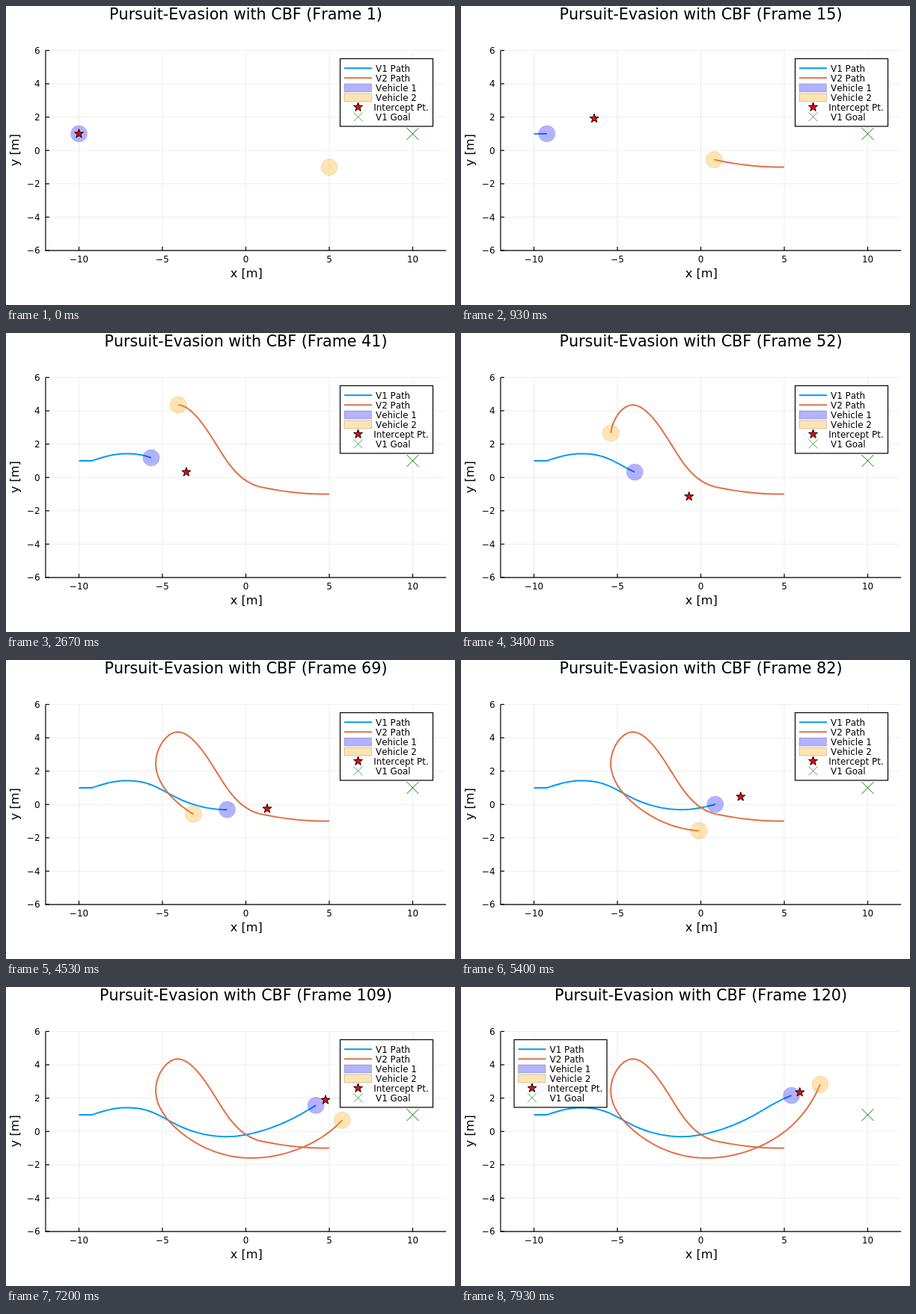
Write an HTML page that moves like this. It is 600 by 400 pixels and loops after 8000 ms.

```html
<!DOCTYPE html>
<html lang="en">
<head>
<meta charset="utf-8">
<title>Pursuit-Evasion</title>
<style>
  html, body { margin: 0; width: 100%; height: 100%; overflow: hidden; background: #fff; }
  svg { display: block; width: 600px; height: 400px; }
  text { font: 11.9px "DejaVu Sans", sans-serif; font-kerning: none; }
  .title { font-size: 20.65px; }
  .label { font-size: 16.2px; }
  .title, .label, .mid { text-anchor: middle; }
  .end { text-anchor: end; }
  .grid { stroke: #000; stroke-opacity: .1; stroke-width: .7; }
  .axis { stroke: #000; stroke-width: 1.2; fill: none; }
  .path { fill: none; stroke-width: 2; stroke-linejoin: round; }
  .v1 { stroke: #009af9; }
  .v2 { stroke: #e26f46; }
  .body1, .body2 { stroke: #000; stroke-opacity: .3; stroke-width: .6; fill-opacity: .3; }
  circle { stroke-opacity: .12 !important; }
  .body1 { fill: #00f; }
  .body2 { fill: #ffa500; }
  .star { fill: #f00; stroke: #000; stroke-width: 1; }
  .goal { stroke: #008000; stroke-width: 1; fill: none; }
  #legend .goal { stroke-width: .7; }
</style>
</head>
<body>
<svg viewBox="0 0 600 400">
  <text class="title" id="title" x="320.5" y="18"></text>
  <g id="axes"></g>
  <text class="label" x="321.3" y="363">x [m]</text>
  <text class="label" transform="translate(17 192.7) rotate(-90)">y [m]</text>
  <path class="path v1" id="path1"/>
  <path class="path v2" id="path2"/>
  <circle class="body1" id="body1" r="11.15"/>
  <circle class="body2" id="body2" r="11.15"/>
  <path class="star" id="star"/>
  <path class="goal" d="M535.5 163l16 16m0-16l-16 16"/>
  <g id="legend">
    <rect x="446.5" y="70.5" width="124" height="90.5" fill="#fff" stroke="#000" stroke-width="1.2"/>
    <path class="path v1" d="M452 83.3h37"/>
    <path class="path v2" d="M452 96.3h37"/>
    <rect class="body1" x="452" y="104" width="36.5" height="11"/>
    <rect class="body2" x="452" y="117" width="36.5" height="11"/>
    <path class="star" id="legendStar" transform="translate(470.5 135.3)"/>
    <path class="goal" d="M464.5 142.3l12 12m0-12l-12 12"/>
  </g>
</svg>
<script>
const FRAMES = 120, LOOP = 8000;
const TURN_AT = 14;               // frame at which steering begins
const LEGEND_MOVES_AT = 118;
const PURSUER_SPEED = .3;         // metres per frame

// Constant acceleration until TURN_AT, then a smooth curve that leaves with
// the velocity `turn` through a few waypoints [frame, x, y] in metres.
const evader = {
  start: [-10, 1], velocity: [0, 0], acceleration: [.0085, 0], turn: [.112, .036],
  waypoints: [[29, -7.38, 1.42], [39, -5.83, 1.235], [51, -3.96, .32], [68, -1.12, -.31],
    [81, .865, .01], [98, 3.07, .91], [113, 4.75, 1.86], [119, 5.43, 2.16]]
};
const pursuer = {
  start: [5, -1], velocity: [-.3, 0], acceleration: [0, .0049], turn: [-.283, .08],
  waypoints: [[29, -2.08, 2.47], [40, -4.05, 4.35], [51, -5.39, 2.66], [68, -3.14, -.59],
    [81, -.11, -1.58], [98, 3.94, -.7], [119, 7.15, 2.82]]
};

const el = id => document.getElementById(id);
const X = x => 320.5 + 22.3 * x;
const Y = y => 193.25 - 22.3 * y;

// Cubic spline with continuous acceleration, a given first slope and a parabolic end
function spline(times, values, firstSlope) {
  const last = times.length - 1;
  const step = i => times[i + 1] - times[i];
  const secant = i => (values[i + 1] - values[i]) / step(i);
  const slopes = times.map(() => firstSlope);
  for (let pass = 0; pass < 60; pass++) {
    for (let i = 1; i < last; i++) {
      const before = step(i - 1), after = step(i);
      slopes[i] = (3 * (after * secant(i - 1) + before * secant(i))
        - after * slopes[i - 1] - before * slopes[i + 1]) / (2 * (before + after));
    }
    slopes[last] = 2 * secant(last - 1) - slopes[last - 1];
  }
  return t => {
    let i = 0;
    while (i < last - 1 && times[i + 1] <= t) i++;
    const h = step(i), u = (t - times[i]) / h;
    return values[i] * (1 + 2 * u) * (1 - u) ** 2 + values[i + 1] * u * u * (3 - 2 * u)
      + h * u * (1 - u) * (slopes[i] * (1 - u) - slopes[i + 1] * u);
  };
}

function makeTrack({ start, velocity, acceleration, turn, waypoints }) {
  const launch = k => start.map((s, a) => s + velocity[a] * k + acceleration[a] * k * (k - 1) / 2);
  const keys = [[TURN_AT, ...launch(TURN_AT)], ...waypoints];
  const times = keys.map(key => key[0]);
  const curves = [0, 1].map(a => spline(times, keys.map(key => key[a + 1]), turn[a]));
  const position = k => k < TURN_AT ? launch(k) : curves.map(curve => curve(k));
  return Array.from({ length: FRAMES + 1 }, (_, k) => position(k));
}

const track1 = makeTrack(evader), track2 = makeTrack(pursuer);

// Where the pursuer at full speed meets vehicle 1 holding its velocity
function intercept(k) {
  const [x, y] = track1[k], [px, py] = track2[k], next = track1[k + 1];
  const vx = next[0] - x, vy = next[1] - y;
  const dx = x - px, dy = y - py;
  const a = PURSUER_SPEED ** 2 - vx * vx - vy * vy;
  const b = dx * vx + dy * vy;
  const time = (b + Math.sqrt(b * b + a * (dx * dx + dy * dy))) / a;
  return [X(x + vx * time), Y(y + vy * time)];
}

function starShape() {
  const points = Array.from({ length: 10 }, (_, i) => {
    const r = i % 2 ? 2.5 : 6.3, angle = i * Math.PI / 5;
    return [r * Math.sin(angle), -r * Math.cos(angle)].map(v => v.toFixed(2));
  });
  return "M" + points.join("L") + "Z";
}

function buildStatic() {
  const left = X(-12), right = X(12), top = Y(6), bottom = Y(-6);
  const number = v => String(v).replace("-", "−");
  let svg = "";
  for (let x = -10; x <= 10; x += 5) {
    svg += `<path class="grid" d="M${X(x)} ${top}V${bottom}"/>
      <path class="axis" d="M${X(x)} ${bottom}v-5"/>
      <text class="mid" x="${X(x)}" y="342.8">${number(x)}</text>`;
  }
  for (let y = -6; y <= 6; y += 2) {
    svg += `<path class="grid" d="M${left} ${Y(y)}H${right}"/>
      <path class="axis" d="M${left} ${Y(y)}h5"/>
      <text class="end" x="45.5" y="${Y(y) + 4.4}">${number(y)}</text>`;
  }
  el("axes").innerHTML = svg + `<path class="axis" d="M${left} ${top}V${bottom}H${right}"/>`;

  const names = ["V1 Path", "V2 Path", "Vehicle 1", "Vehicle 2", "Intercept Pt.", "V1 Goal"];
  el("legend").innerHTML += names.map((name, i) =>
    `<text x="${name.startsWith("I") ? 491.3 : 494}" y="${87.7 + 13 * i}">${name}</text>`).join("");
  el("star").setAttribute("d", starShape());
  el("legendStar").setAttribute("d", starShape());
}

function showVehicle(n, track, k) {
  const points = track.slice(0, k + 1).map(([x, y]) => [X(x).toFixed(2), Y(y).toFixed(2)]);
  el("path" + n).setAttribute("d", "M" + points.join("L"));
  el("body" + n).setAttribute("cx", points[k][0]);
  el("body" + n).setAttribute("cy", points[k][1]);
}

function show(k) {
  el("title").textContent = `Pursuit-Evasion with CBF (Frame ${k + 1})`;
  showVehicle(1, track1, k);
  showVehicle(2, track2, k);
  el("star").setAttribute("transform", `translate(${intercept(k)})`);
  el("legend").setAttribute("transform", `translate(${k >= LEGEND_MOVES_AT ? -375.5 : 0} 0)`);
}

let shown = -1;
function tick() {
  // 15 frames per second, with changes rounded to hundredths of a second
  const hundredths = Math.floor(performance.now() % LOOP / 10);
  const k = Math.min(FRAMES - 1, Math.floor((hundredths + .5) * .15));
  if (k !== shown) show(shown = k);
  requestAnimationFrame(tick);
}

buildStatic();
tick();
</script>
</body>
</html>
```
